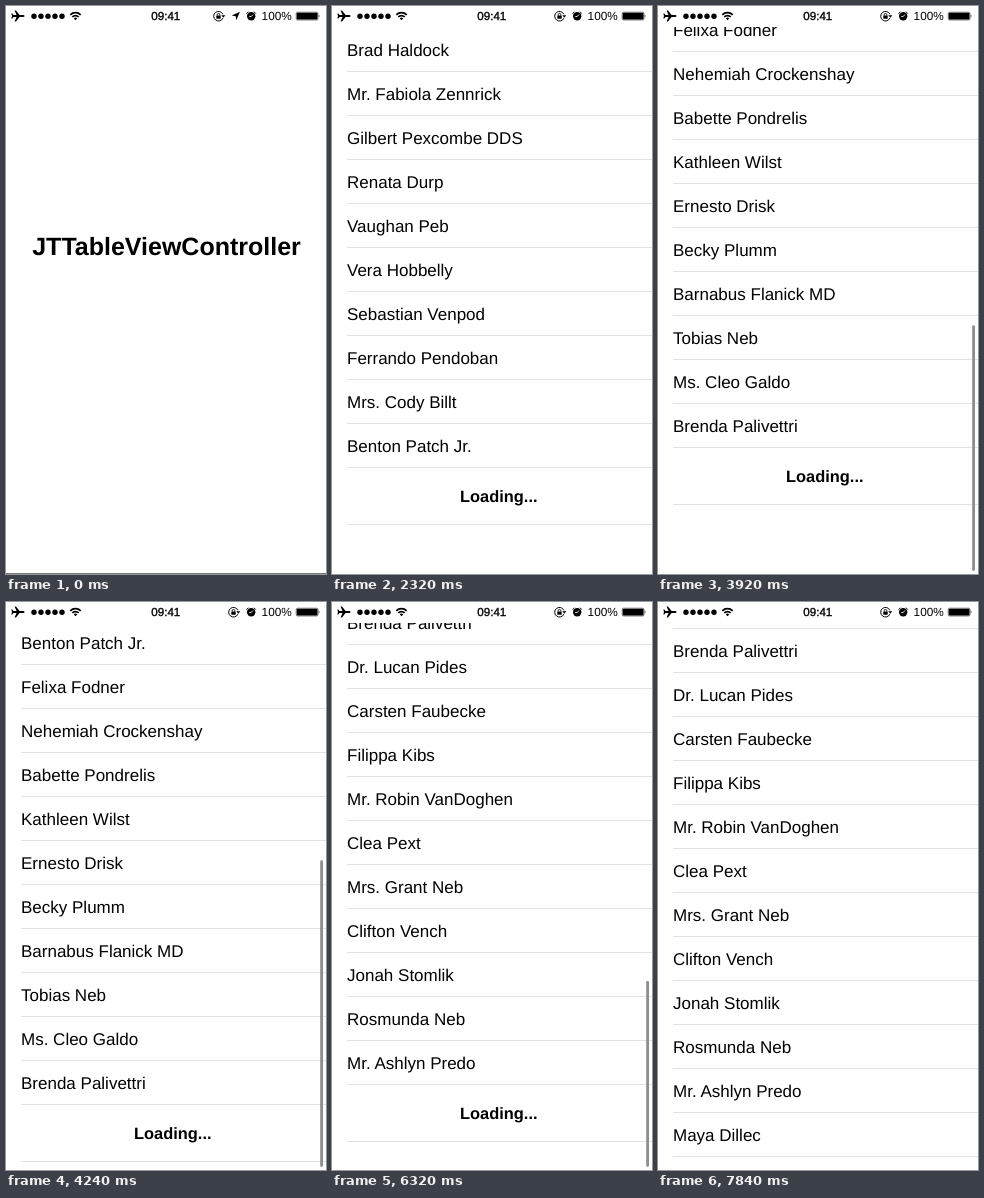
Animation, 320 px wide and 568 px high, one loop 8 s. Source, as an HTML page:

```html
<!DOCTYPE html>
<html lang="en">
<head>
<meta charset="utf-8">
<title>JTTableViewController</title>
<style>
  html, body { margin: 0; width: 100%; height: 100%; overflow: hidden; background: #fff; }
  svg { display: block; width: 320px; height: 568px; }
  text { font-family: "Liberation Sans", Arial, Helvetica, sans-serif; fill: #000; text-rendering: geometricPrecision; }
  .name { font-size: 17px; }
  .bold { font-weight: bold; text-anchor: middle; }
  .line { fill: none; stroke: #000; }
  .rule { fill: #e2e2e4; }
</style>
</head>
<body>
<svg viewBox="0 0 320 568">
  <defs>
    <clipPath id="below"><rect y="21" width="320" height="547"/></clipPath>
  </defs>
  <rect width="320" height="568" fill="#fff"/>
  <text class="bold" x="160.5" y="249" font-size="25">JTTableViewController</text>

  <g id="sheet">
    <rect width="320" height="568" fill="#fff"/>
    <rect id="edge" width="320" height="1" fill="#777"/>
    <g clip-path="url(#below)">
      <g id="list">
        <g id="loading">
          <text class="bold" x="166.8" y="34" font-size="16.4">Loading...</text>
          <rect class="rule" x="15" y="56" width="305" height="1"/>
        </g>
      </g>
    </g>
    <rect id="bar" x="314.2" width="2.8" rx="1.4" fill="#8e8e8e"/>
  </g>

  <g id="status">
    <path d="M18.6 10q0-1-1.6-1h-3.4l-3.6-4.4h-1.4l1.9 4.4h-3l-1.2-1.5h-1l.7 2.5-.7 2.5h1l1.2-1.5h3l-1.9 4.4h1.4l3.6-4.4h3.4q1.6 0 1.6-1z"/>
    <g id="dots"></g>
    <g class="line" stroke-width="1.7">
      <path d="M64.3 8.9a7.3 7.3 0 0 1 10.4 0"/>
      <path d="M66.3 10.9a4.5 4.5 0 0 1 6.4 0"/>
    </g>
    <path d="M69.5 14.2l-1.7-1.8a2.4 2.4 0 0 1 3.4 0z"/>
    <text x="159.8" y="14" font-size="11.6" text-anchor="middle" stroke="#000" stroke-width=".35">09:41</text>
    <g id="lock">
      <path class="line" d="M4.4 1.9a4.8 4.8 0 1 1 0-3.8"/>
      <path d="M2.8-.9h4l-2 2.5z"/>
      <rect x="-2.2" y="-.7" width="4.4" height="3.2" rx=".4"/>
      <path class="line" stroke-width=".9" d="M-1.3-.5v-1a1.3 1.3 0 0 1 2.6 0v1"/>
    </g>
    <path id="arrow" d="M234 5.8l-3.7 8.4-.6-4-4-.6z"/>
    <g transform="translate(245.2 10.3)">
      <circle r="4.2"/>
      <path class="line" d="M-4.6-2.7l1.9-1.9M4.6-2.7l-1.9-1.9"/>
      <path fill="none" stroke="#fff" stroke-width=".9" d="M1.7-1.7l-1.7 1.9-1.9 0"/>
    </g>
    <text x="255.6" y="14.2" font-size="11.8">100%</text>
    <rect class="line" x="290.2" y="6.2" width="21.8" height="7.8" rx="1.4" stroke-width=".5"/>
    <rect x="290.7" y="6.7" width="20.8" height="6.8" rx=".9"/>
    <path d="M312.8 8.6q1.5 1.5 0 3z"/>
  </g>
</svg>
<script>
const LOOP = 8000, STEP = 80, TOP = 22, ROW = 44, FOOT = 57, VIEW = 568;
const names = [
  "Brad Haldock", "Mr. Fabiola Zennrick", "Gilbert Pexcombe DDS", "Renata Durp",
  "Vaughan Peb", "Vera Hobbelly", "Sebastian Venpod", "Ferrando Pendoban",
  "Mrs. Cody Billt", "Benton Patch Jr.", "Felixa Fodner", "Nehemiah Crockenshay",
  "Babette Pondrelis", "Kathleen Wilst", "Ernesto Drisk", "Becky Plumm",
  "Barnabus Flanick MD", "Tobias Neb", "Ms. Cleo Galdo", "Brenda Palivettri",
  "Dr. Lucan Pides", "Carsten Faubecke", "Filippa Kibs", "Mr. Robin VanDoghen",
  "Clea Pext", "Mrs. Grant Neb", "Clifton Vench", "Jonah Stomlik",
  "Rosmunda Neb", "Mr. Ashlyn Predo", "Maya Dillec"
];
// times at which each page of ten rows arrives
const pages = [1600, 3360, 5600, 7840];
const flicks = [
  { start: 3760, from: 0, to: 391, over: 69 },
  { start: 6000, from: 391, to: 831, over: 62 }
];

const $ = id => document.getElementById(id);
const move = (el, x, y) => el.setAttribute("transform", `translate(${x} ${y})`);
const show = (el, on) => el.setAttribute("visibility", on ? "visible" : "hidden");

function add(parent, tag, attrs, text = "") {
  const el = document.createElementNS("http://www.w3.org/2000/svg", tag);
  for (const key in attrs) el.setAttribute(key, attrs[key]);
  el.textContent = text;
  return parent.appendChild(el);
}

const rows = names.map((name, i) => {
  const row = add($("list"), "g", {});
  add(row, "text", { class: "name", x: 15, y: 27.5 }, name);
  add(row, "rect", { class: "rule", x: 15, y: ROW - 1, width: 305, height: 1 });
  move(row, 0, TOP + i * ROW);
  return row;
});
for (let i = 0; i < 5; i++) add($("dots"), "circle", { cx: 28 + i * 7, cy: 10.2, r: 2.7 });

// critically damped spring, 1 down to 0
const settle = x => (1 + x) * Math.exp(-x);

function scrollAt(t) {
  const f = flicks.filter(f => t >= f.start).pop();
  if (!f) return 0;
  const k = (t - f.start) / STEP;
  const reach = f.to + f.over - f.from;
  if (k < 2) return Math.round(f.from + reach * (k < 1 ? 0.22 : 0.7));
  return Math.round(f.to + f.over * settle((k - 2) * 0.92));
}

function drawBar(t, count, scroll) {
  const on = flicks.some(f => t >= f.start && t <= f.start + 800);
  show($("bar"), on);
  if (!on) return;
  const content = count * ROW + FOOT, max = content + TOP - VIEW;
  const track = 540, len = track * (VIEW - TOP) / content;
  const extra = Math.max(0, scroll - max);
  const top = 25 + (track - len) * Math.min(1, scroll / max) + extra;
  $("bar").setAttribute("y", top);
  $("bar").setAttribute("height", len - extra);
}

function draw(now) {
  const t = Math.floor(now % LOOP / STEP) * STEP;
  const y = t < 400 ? Math.round(567 * settle(t * 0.023)) : 0;
  move($("sheet"), 0, y);
  show($("edge"), y > 0);

  const count = 10 * pages.filter(p => t >= p).length;
  const scroll = scrollAt(t);
  rows.forEach((row, i) => show(row, i < count));
  move($("loading"), 0, TOP + count * ROW);
  move($("list"), 0, -scroll);
  drawBar(t, count, scroll);

  show($("arrow"), t < 800);
  move($("lock"), t < 800 ? 212.5 : 227.5, 10.2);
}

const begin = performance.now();
function tick() {
  draw(performance.now() - begin);
  requestAnimationFrame(tick);
}
tick();
</script>
</body>
</html>
```
